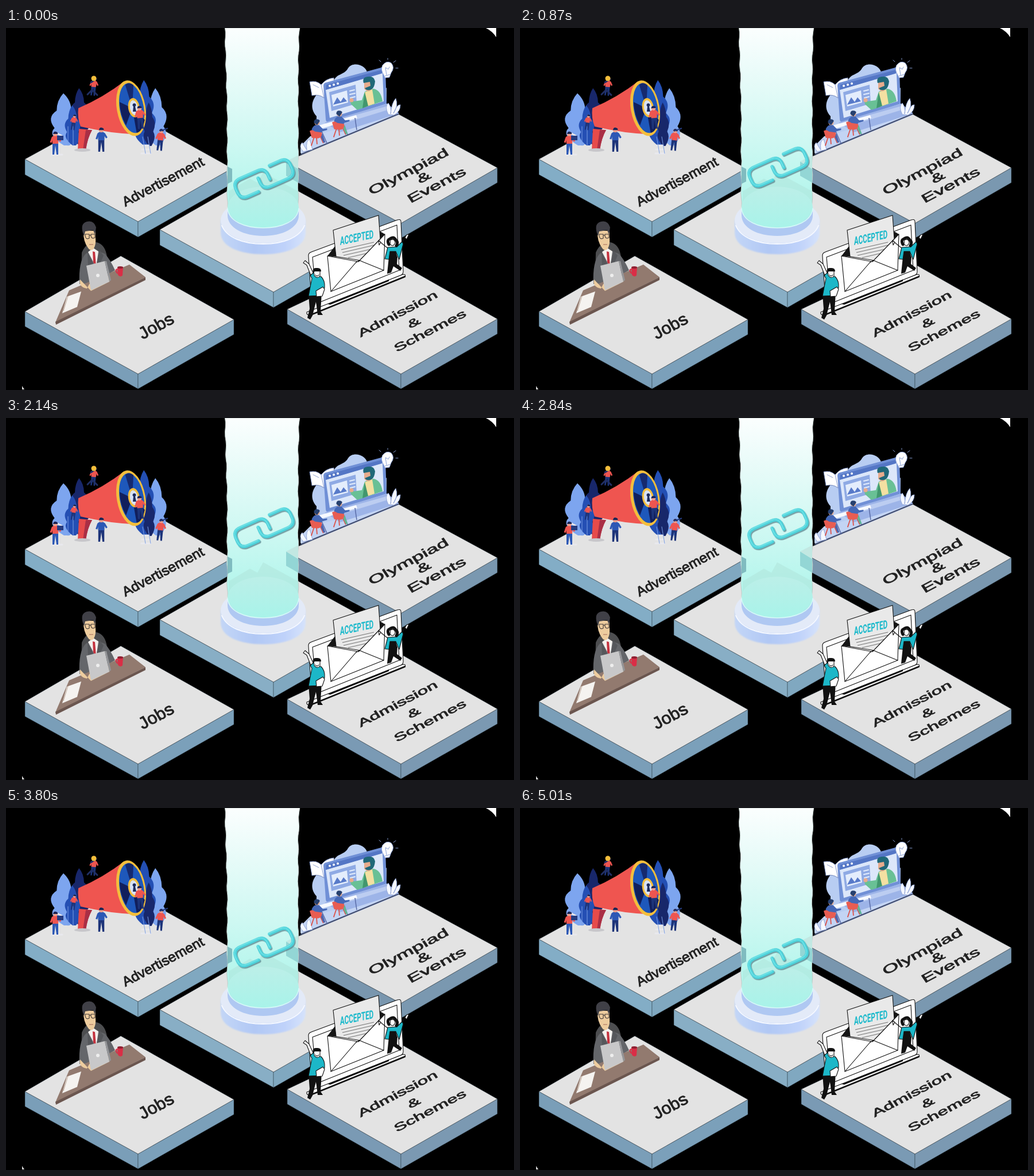
These frames come from a looping animation (885 px wide and 632 px high, 5050 ms). An HTML page:

```html
<!DOCTYPE html>
<html lang="en">
<head>
<meta charset="utf-8">
<title>Services</title>
<style>
  html, body { margin: 0; width: 100%; height: 100%; overflow: hidden; background: #000; }
  svg { display: block; width: 885px; height: 632px; }
  .label { font-family: "Liberation Sans", Arial, sans-serif; fill: #222; stroke: #222; stroke-width: 1; }
  .ink { stroke: #111; stroke-width: 1.1; stroke-linejoin: round; }
  .line { fill: none; stroke-linecap: round; stroke-linejoin: round; }
</style>
</head>
<body>
<svg viewBox="0 0 885 632">
  <defs>
    <linearGradient id="glow" x1="0" y1="0" x2="0" y2="1">
      <stop offset="0" stop-color="#fbfefe"/>
      <stop offset=".3" stop-color="#e6fbf8"/>
      <stop offset=".65" stop-color="#cdf8f2"/>
      <stop offset="1" stop-color="#aff5eb"/>
    </linearGradient>
    <linearGradient id="rim">
      <stop offset="0" stop-color="#c3d6f7"/>
      <stop offset=".4" stop-color="#b1c8f4"/>
      <stop offset=".75" stop-color="#bfd2fa"/>
      <stop offset="1" stop-color="#d6e3fb"/>
    </linearGradient>
    <linearGradient id="disc" x1="0" y1="0" x2="0" y2="1">
      <stop offset="0" stop-color="#bcefe8"/>
      <stop offset="1" stop-color="#a8f3e9"/>
    </linearGradient>
    <filter id="soft"><feGaussianBlur stdDeviation="1"/></filter>
  </defs>

  <path d="M836 0H854V16Q848 6 836 0Z" fill="#fff"/>
  <path d="M28 625L32 631H28Z" fill="#ddd"/>

  <g id="tiles"></g>

  <!-- pedestal and beam -->
  <g>
    <path d="M374 335V357C374 382 407 395 448 395S522 382 522 357V335Z" fill="url(#rim)" filter="url(#soft)"/>
    <ellipse cx="448" cy="336" rx="74" ry="40" fill="#e3eaf8"/>
    <path d="M376 345C384 365 412 377 448 377S512 365 520 345" class="line" stroke="#f5f8ff" stroke-width="2"/>
    <path d="M386 313V327C386 349 414 363 448 363S510 349 510 327V313Z" fill="#afc8f2"/>
    <path id="beam" fill="url(#glow)" stroke="#bfcac7"/>
    <path d="M386 242L394 246V268L386 272Z" fill="#80bcc0"/>
    <path d="M488 233L509 246V270L488 258Z" fill="#93d6d5"/>
    <path d="M488 233L509 222V246Z" fill="#c2e8e2"/>
    <path d="M388 285L425 263L438 270L448 252L509 285V318H388Z" fill="#b0e4d9" opacity=".5"/>
    <ellipse cx="448" cy="313" rx="62" ry="36" fill="url(#disc)"/>
    <path d="M386 315C388 337 415 349 448 349S508 337 510 315" class="line" stroke="#d5fbf7" stroke-width="1.6"/>
  </g>

  <!-- megaphone -->
  <g>
    <g id="trees"></g>
    <path d="M127 176L150 178Q142 192 139 213H125Z" fill="#e64b4b"/>
    <path d="M139 178L150 178Q142 192 139 213H134Z" fill="#a92f45"/>
    <ellipse cx="133" cy="213" rx="14" ry="3" fill="#c7c7cb"/>
    <path d="M126 140Q170 121 206 93L232 186Q180 184 130 172Q124 157 126 140Z" fill="#ef5550"/>
    <g transform="rotate(-10 218 140)">
      <ellipse cx="218" cy="140" rx="25" ry="49" fill="#f4be3c"/>
      <ellipse cx="219" cy="140" rx="21" ry="44" fill="#1e58bb"/>
      <path d="M220 140L200 126Q197 148 204 168ZM220 140L238 164Q230 184 220 184Z" fill="#111f5c"/>
      <path d="M220 140L215 98Q222 93 229 101Z" fill="#15296e"/>
      <ellipse cx="223" cy="140" rx="10" ry="17" fill="#f4be3c"/>
      <ellipse cx="223" cy="140" rx="7" ry="13" fill="#d7e2f6"/>
    </g>
    <path d="M221 146L222 137A3 3 0 1 1 225 137L227 146Z" fill="#1c2b5d"/>
    <path d="M87 183L97 188M239 205H249M237 212H250M236 219H252M80 221H98" class="line" stroke="#e9e9ee" stroke-width="3"/>
    <path d="M238 190L243 219M247 190L252 219M108 172V205M117 172V205" class="line" stroke="#7da0e5"/>
    <g id="crew"></g>
    <path d="M142 116L150 108L159 117M148 95L157 89" class="line" stroke="#202f65" stroke-width="3"/>
    <circle cx="153" cy="88" r="4.5" fill="#f4be3c"/>
    <path d="M90 189H99V195H90ZM268 180L282 175" fill="#263c80" stroke="#263c80" stroke-width="2"/>
  </g>

  <!-- online class -->
  <g>
    <path d="M541 154C520 130 548 104 570 95C575 78 588 84 596 70C604 58 626 64 629 77L663 105V160L540 205Z" fill="#b8cdf2"/>
    <path d="M513 218V206L530 189L684 149V152L516 221Z" fill="#c3d4f4"/>
    <path d="M513 221L684 150" stroke="#434e70" stroke-width="2.4"/>
    <path d="M529 94Q541 91 549 99Q558 88 571 87L574 113Q561 114 554 122Q545 115 533 118Z" fill="#fff" stroke="#7589bb"/>
    <path d="M549 99L554 122M535 99L545 104M557 99L569 94" class="line" stroke="#8d9fcf"/>
    <path d="M553 101Q553 96 558 95L654 69Q660 68 661 74L663 132L565 164Q557 166 557 159Z" fill="#7090d6"/>
    <path d="M557 108L656 79L658 128L564 157Z" fill="#dce7fa"/>
    <path d="M558 99L655 73V79L557 108Z" fill="#5476c5"/>
    <circle cx="564" cy="101" r="2" fill="#fff"/><circle cx="571" cy="99" r="2" fill="#fff"/><circle cx="578" cy="97" r="2" fill="#fff"/>
    <path d="M563 112L609 99L611 132L567 145Z" fill="#8faae4"/>
    <path d="M567 117L594 109L596 130L570 137Z" fill="#e4edfc"/>
    <path d="M570 134L577 121L583 129L588 121L594 128Z" fill="#587ac9"/>
    <path d="M599 110L607 108M599 116L608 114M600 122L608 120" class="line" stroke="#e4edfc" stroke-width="2"/>
    <path d="M601 133L599 123L606 128L620 126L625 111L640 106Q653 108 656 128L612 143Z" fill="#69c095"/>
    <path d="M625 112L638 107L642 132L628 137Z" fill="#f3e0a2"/>
    <path d="M625 112L621 140L631 136Z" fill="#42976e"/>
    <circle cx="602" cy="126" r="3.5" fill="#e9ab8c"/>
    <path d="M624 93H639V104Q632 116 624 106Z" fill="#e7ac8c"/>
    <path d="M623 96Q620 86 630 85Q641 83 643 93Q642 104 637 107Q629 111 625 105L635 101L634 94Z" fill="#1f6878"/>
    <path d="M555 165L664 132L685 149L582 182Z" fill="#9db4e8"/>
    <path d="M562 165L662 137L668 142L574 171Z" fill="#bccdf1"/>
    <path d="M658 82Q652 73 656 65Q663 56 671 61Q678 69 671 78L668 86L660 87Z" fill="#fff" stroke="#88a0d6"/>
    <path d="M660 84L669 81M663 82L661 69L666 72L668 68M653 59L650 56M665 55V53M675 60L679 57M679 70H683" class="line" stroke="#88a0d6"/>
    <path d="M666 151Q659 137 666 131Q672 139 670 150Q672 130 679 123Q684 136 675 149Q681 133 687 134Q687 146 676 152Z" fill="#f5f8ff" stroke="#93a6d6"/>
    <path d="M518 216Q509 207 516 200L524 213Q522 196 529 194L534 212Z" fill="#f5f8ff" stroke="#93a6d6"/>
    <path d="M545 170L610 152L612 157L548 176Z" fill="#f7faff"/>
    <path d="M548 176L560 203M608 157L611 178M585 165L595 186" stroke="#596ba6" stroke-width="1.5"/>
    <g id="pupils"></g>
  </g>

  <!-- office -->
  <g>
    <path d="M132 392Q140 373 157 374Q173 377 176 400L180 440H131Z" fill="#4d4e50"/>
    <path d="M128 447Q126 407 139 394L153 387L172 394Q181 403 190 423L178 430L172 446Z" fill="#64666a"/>
    <path d="M143 391L152 384L161 390L157 418Z" fill="#f3f1ee"/>
    <path d="M151 390L155 391L157 416L152 409Z" fill="#c43340"/>
    <path d="M142 391L156 420L163 389L170 397L158 426L143 416Z" fill="#55575b"/>
    <path d="M135 354H156V366Q157 378 153 385Q148 391 143 384Q134 372 135 354Z" fill="#edcc9e"/>
    <path d="M134 358Q129 341 141 338Q153 335 157 348L155 361L152 353L138 355L136 363Z" fill="#404047"/>
    <path d="M138 360H145V367Q139 370 138 363ZM148 360H155V366Q149 369 148 363ZM145 362H148" class="line" stroke="#3c3536" stroke-width="1.1"/>
    <path d="M145 378H152" stroke="#a46959"/>
    <path d="M110 458L215 413L243 435L86 514Z" fill="#927a6f"/>
    <path d="M86 513L243 435V440L87 518Z" fill="#6b564f"/>
    <path d="M129 439Q126 452 141 455L145 447L178 432L181 442L172 447L148 459Z" fill="#edcc9e"/>
    <path d="M140 415L172 407L180 443L148 458Z" fill="#c8c8c9"/>
    <path d="M172 407L175 407L183 440L180 443Z" fill="#949598"/>
    <circle cx="160" cy="432" r="3" fill="#eee"/>
    <path d="M106 469L131 460L124 487L98 498Z" fill="#f5f3f0"/>
    <path d="M100 494L108 468" stroke="#bba797"/>
    <path d="M194 419L204 417L203 432Q199 436 195 431Z" fill="#d92e46"/>
    <ellipse cx="199" cy="418" rx="5" ry="2" fill="#8e2030"/>
    <path d="M194 421Q189 422 194 428" class="line" stroke="#d92e46" stroke-width="2"/>
  </g>

  <!-- acceptance letter -->
  <g>
    <path class="ink" d="M527 399Q526 393 532 391L682 335Q688 333 688 338L692 425Q692 430 687 432L541 491Q534 493 533 487Z" fill="#fff"/>
    <path class="ink" d="M534 400L681 344L685 423L541 481Z" fill="#fdfdfd"/>
    <path class="ink" d="M524 496L692 430Q698 430 694 435L531 501Q523 502 524 496Z" fill="#fff"/>
    <path d="M560 482L667 439V442L565 483Z" fill="#111"/>
    <path d="M528 502L695 434" class="line" stroke="#111" stroke-width="2.6"/>
    <path d="M560 398L573 381L650 354L660 360L617 404Z" fill="#161616"/>
    <path class="ink" d="M570 353L649 327L652 368L618 406L575 399Z" fill="#e9e9e9"/>
    <text transform="matrix(.63 -.13 .02 1.1 582 379)" font-family="Roboto, 'Liberation Sans', sans-serif" font-weight="700" font-size="18.5" fill="#1ab9cb">ACCEPTED</text>
    <path d="M584 387L641 374M586 392L642 379M588 397L641 385M596 401L630 393" stroke="#777" stroke-width="1.2"/>
    <path class="ink" d="M560 398L614 408L660 360L658 423L566 460Z" fill="#fff"/>
    <path class="ink line" d="M566 460L609 410Q615 404 621 408L658 423"/>
    <path d="M667 400L682 399L681 412L690 419L687 424L675 416L671 427L664 429Z" fill="#111"/>
    <path class="ink line" d="M667 386L651 373M682 385L697 364" stroke-width="3"/>
    <path class="ink" d="M665 383L681 382L690 373L692 377L685 404L679 390H669L667 404L660 403Z" fill="#1cb7c8"/>
    <path d="M669 390H679L682 401L667 403Z" fill="#111"/>
    <path class="ink" d="M695 366L698 361L702 360L698 369ZM653 374L649 371L650 379Z" fill="#fff"/>
    <path class="line" d="M667 378Q663 370 669 368Q675 363 679 370Q684 374 680 380" stroke="#111" stroke-width="5"/>
    <path class="ink" d="M670 370Q677 367 678 375Q674 384 669 377Z" fill="#fff"/>
    <path d="M527 465L550 462L548 495L552 501H543L540 478L534 502L530 509L525 506L529 490Z" fill="#111"/>
    <path class="ink" d="M533 437L524 414L518 410L521 406L528 412L538 434Z" fill="#fff"/>
    <path class="ink" d="M533 437L530 432L536 427L541 434H549Q556 441 555 453L550 467L527 468L530 452Z" fill="#1cb7c8"/>
    <path class="ink" d="M540 459L552 452L555 456L551 468L541 469Z" fill="#fff"/>
    <path class="ink" d="M536 424H547V433Q542 439 537 432Z" fill="#fff"/>
    <path d="M535 427Q533 418 541 419Q549 418 549 425L538 425Z" fill="#111"/>
    <path d="M539 431Q542 435 545 431" class="ink line"/>
  </g>

  <g id="labels" class="label"></g>

  <!-- chain link -->
  <g id="link">
    <g class="line" transform="translate(449.5 263) rotate(-24)">
      <g stroke="#587f88" stroke-width="6" transform="translate(.6 2.2)" opacity=".75"><use href="#rings"/></g>
      <g stroke="#4bd3db" stroke-width="5.6">
        <g id="rings">
          <path id="ring" d="M-18 17H-38Q-52 17 -52 3V-3Q-52 -17 -38 -17H-5Q9 -17 9 -3V5"/>
          <use href="#ring" transform="rotate(180)"/>
        </g>
      </g>
      <g stroke="#8cecef" stroke-width="1" transform="translate(-.5 -1)"><use href="#rings"/></g>
    </g>
  </g>
</svg>
<script>
const fill = (id, list) => { document.getElementById(id).innerHTML = list.join(""); };
const poly = (pts, color) => `<polygon points="${pts.join(" ")}" fill="${color}" stroke="#26343e" stroke-width=".5"/>`;

// corners: left, top, right, bottom; drop is the slab height
const tile = (l, t, r, b, drop, lit, dark) => {
  const down = p => [p[0], p[1] + drop];
  return poly([l, b, down(b), down(l)], lit) + poly([b, r, down(r), down(b)], dark) + poly([l, t, r, b], "#e3e3e3");
};
fill("tiles", [
  tile([268, 352], [446, 250], [644, 359], [466, 461], 27, "#88aec5", "#80a8c0"),
  tile([33, 229], [200, 137], [394, 245], [230, 338], 27, "#83adc6", "#80a8c0"),
  tile([488, 233], [683, 150], [856, 244], [688, 341], 26, "#7996ae", "#7a98b0"),
  tile([33, 495], [200, 398], [397, 509], [230, 604], 26, "#7a9eb8", "#7ba0ba"),
  tile([490, 491], [673, 404], [856, 508], [688, 604], 26, "#7a9ab4", "#7b99b2")
]);

// beam with ragged sides
const side = (x, phase) => Array.from({ length: 40 }, (_, i) => {
  const y = i * 8;
  return [x(y) + Math.sin(i * 1.35 + phase) * .8, y];
});
const edge = [...side(y => 381.5 + Math.min(4, y / 35), 0), ...side(y => 511 - Math.min(2, y / 30), 2).reverse()];
document.getElementById("beam").setAttribute("d", `M${edge.join("L")}Z`);

const leaf = (x, y, w, h, n, color) => {
  const span = t => w * Math.sin(Math.PI * (.2 + .78 * t));
  const at = (s, t, k) => `${x + s * k * span(t)} ${y + h * (1 - t)}`;
  let d = `M${x} ${y + h}`;
  for (let i = 0; i < n; i++) d += `Q${at(-1, (i + .6) / n, 1.5)} ${at(-1, (i + 1) / n, .75)}`;
  for (let i = n; i > 0; i--) d += `Q${at(1, (i - .4) / n, 1.5)} ${at(1, (i - 1) / n, .75)}`;
  return `<path d="${d}Z" fill="${color}"/>`;
};
fill("trees", [
  leaf(101, 114, 22, 91, 3, "#7da5ef"), leaf(128, 105, 17, 100, 4, "#18276b"),
  leaf(116, 135, 13, 70, 3, "#244fb4"), leaf(261, 105, 18, 100, 3, "#7da5ef"),
  leaf(241, 91, 18, 115, 4, "#234fb4"), leaf(249, 130, 10, 76, 3, "#18276b")
]);

// standing figure, feet at x, y
const person = (x, y, h, shirt, pants, lean = 0) => `<g transform="translate(${x} ${y}) rotate(${lean}) scale(${h / 40})">
  <path d="M-5 -22H5L5 0H2L0 -16L-2 0H-5Z" fill="${pants}"/>
  <path d="M-6 -31Q0 -36 6 -31L5 -19H-5Z" fill="${shirt}"/>
  <path d="M-5 -30L-8 -21M5 -30L9 -23" stroke="${shirt}" stroke-width="3"/>
  <circle cy="-36" r="3.8" fill="#efa08c"/><path d="M-4 -36Q-3 -41 1 -40Q5 -39 4 -36Z" fill="#1a2555"/></g>`;
const red = "#ee5550", navy = "#1d3479", blue = "#2c58b5";
fill("crew", [
  person(86, 221, 40, red, blue), person(166, 216, 42, blue, navy),
  person(267, 214, 38, red, navy, 6), person(116, 178, 27, red, navy, 8),
  person(235, 176, 40, red, navy, -4), person(151, 118, 32, red, navy, 6)
]);

const pupil = (x, y, pants) => `<g transform="translate(${x} ${y}) scale(.92)">
  <path d="M-5 15L-10 30M7 12L13 25M0 15L1 27" stroke="#dc554d" stroke-width="2"/>
  <path d="M-1 12L11 7L17 24H13L8 13Z" fill="${pants}"/>
  <path d="M-9 -2Q-4 -12 5 -9L12 -2L20 -3V0L10 3L7 10L-9 13Z" fill="#4568b6"/>
  <path d="M-13 2Q-8 -2 -3 3L10 5Q11 15 2 16L-9 15Z" fill="#e85d52"/>
  <circle cx="1" cy="-14" r="5" fill="#e6aa8c"/><path d="M-5 -14Q-5 -22 3 -20Q8 -18 5 -15L1 -9Z" fill="#26406f"/></g>`;
fill("pupils", [pupil(541, 178, "#4d66ae"), pupil(580, 163, "#61b494")]);

const flat = [.87, -.46, .48, .82], wide = [1.13, -.59, .42, .62];
const label = (text, x, y, size, plane) => `<text transform="matrix(${[...plane, x, y]})" font-size="${size}">${text}</text>`;
fill("labels", [
  label("Advertisement", 208, 312, 25, flat),
  label("Jobs", 238, 544, 31, flat),
  label("Olympiad", 637, 292, 28.5, wide),
  label("&amp;", 721, 272, 28, wide),
  label("Events", 705, 306, 28.5, wide),
  label("Admission", 618, 540, 26, wide),
  label("&amp;", 704, 525, 26, wide),
  label("Schemes", 681, 566, 26, wide)
]);

// link rises, sinks a little faster, then rests
const LOOP = 5050, sine = "cubic-bezier(.37,0,.63,1)";
const pose = (y, ms) => ({ transform: `translateY(${y}px)`, offset: ms / LOOP, easing: sine });
document.getElementById("link").animate(
  [pose(0, 0), pose(-75, 2500), pose(0, 4500), pose(0, LOOP)],
  { duration: LOOP, iterations: Infinity }
);
</script>
</body>
</html>
```
